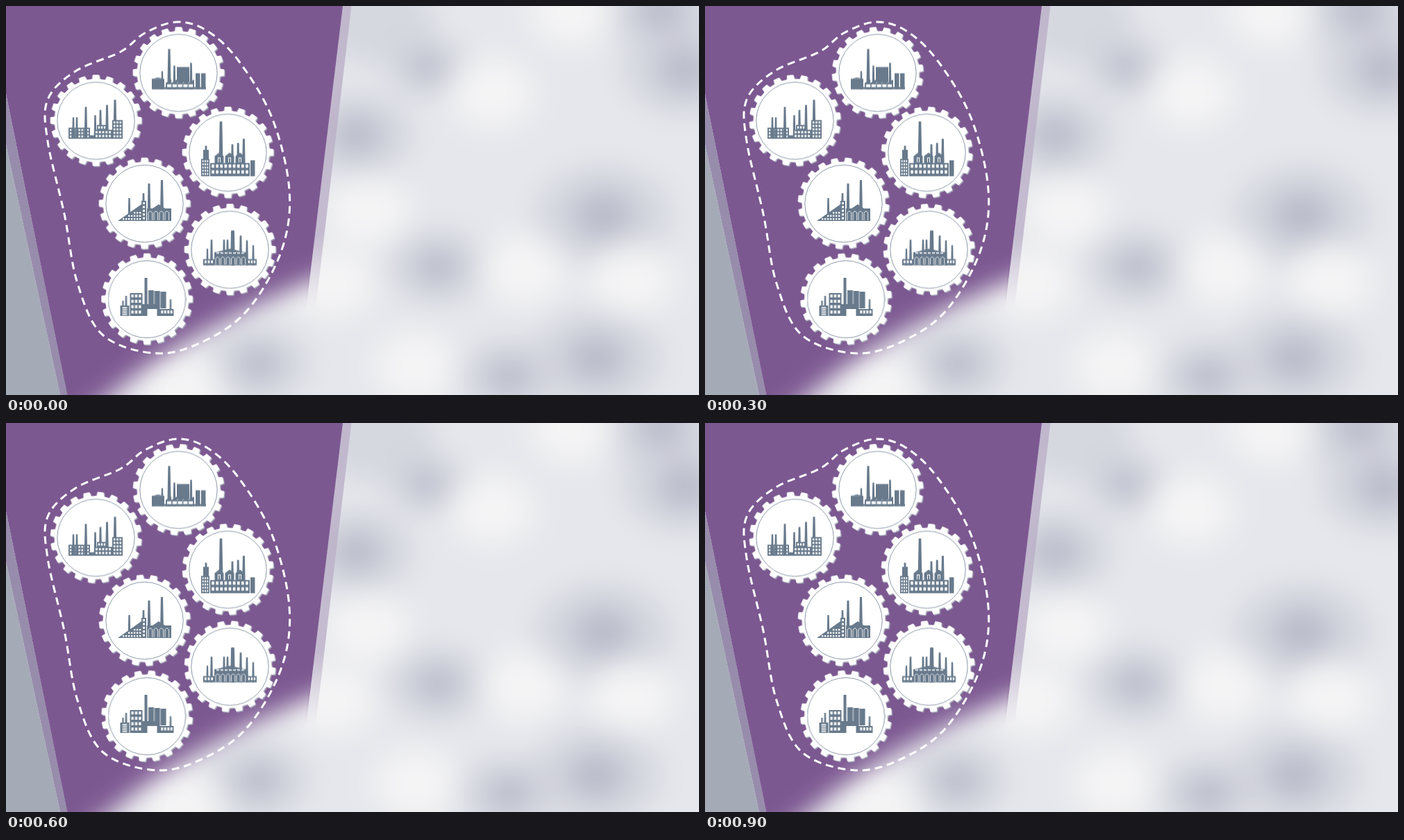
An HTML page for the animation above (1 s loop, 998 by 561 pixels).

```html
<!DOCTYPE html>
<html lang="en">
<head>
<meta charset="utf-8">
<title>Factory gears</title>
<style>
html, body { margin: 0; width: 100%; height: 100%; overflow: hidden; background: #e6e7ec; }
svg { display: block; width: 998px; height: 561px; }
</style>
</head>
<body>
<svg viewBox="0 0 998 561" xmlns="http://www.w3.org/2000/svg">
  <defs>
    <filter id="haze" filterUnits="userSpaceOnUse" x="-100" y="-100" width="1200" height="770"><feGaussianBlur stdDeviation="20"/></filter>
    <filter id="soft" filterUnits="userSpaceOnUse" x="-100" y="-100" width="800" height="800"><feGaussianBlur stdDeviation="17"/></filter>
    <linearGradient id="fade" x1="0" y1="330" x2="0" y2="435" gradientUnits="userSpaceOnUse">
      <stop offset="0" stop-color="#fff"/><stop offset="1" stop-color="#000"/>
    </linearGradient>
    <mask id="cloud" maskUnits="userSpaceOnUse" x="0" y="0" width="998" height="561">
      <path d="M-90-90H600V340Q310 428 160 553T-90 680Z" fill="#fff" filter="url(#soft)"/>
    </mask>
    <mask id="low" maskUnits="userSpaceOnUse" x="0" y="0" width="998" height="561">
      <rect width="998" height="561" fill="url(#fade)"/>
    </mask>
  </defs>
  <g id="mist" filter="url(#haze)"></g>
  <path d="M484 0H497.500L446 435H430Z" fill="#bcb0c9" opacity=".8" mask="url(#low)"/>
  <path d="M0 0H485L428 470 300 561H88L0 127Z" fill="#7c5891" mask="url(#cloud)"/>
  <path d="M0 127 88.500 561H78L0 200Z" fill="#988cac"/>
  <path d="M0 200 78 561H0Z" fill="#a5aab7"/>
  <path id="track" fill="none" stroke="#fff" stroke-width="3"/>
  <g id="gears"></g>
</svg>
<script>
const NS = 'http://www.w3.org/2000/svg';
const byId = id => document.getElementById(id);
const loop = (n, fn) => Array.from({ length: n }, (_, i) => fn(i));

function add(parent, tag, attrs) {
  const el = document.createElementNS(NS, tag);
  for (const k in attrs) el.setAttribute(k, attrs[k]);
  return parent.appendChild(el);
}

// Mist: light patches, then dark spots, each a wide halo with a core
const mist = byId('mist');
const puff = (cx, cy, rx, ry, fill, opacity) => add(mist, 'ellipse', { cx, cy, rx, ry, fill, opacity });
const dark = [[530, 20, 40], [607, 88, 28], [942, 5, 38], [978, 92, 42], [505, 186, 38],
  [860, 302, 46], [622, 376, 34], [364, 516, 34], [724, 535, 34], [850, 508, 44]];
const light = [[815, 8], [700, 125], [520, 295], [470, 400], [745, 380], [900, 395], [590, 520], [250, 550]];
add(mist, 'rect', { x: -100, y: -100, width: 1200, height: 770, fill: '#e6e7ec' });
for (const [x, y, r] of dark) puff(x, y, r * 2.2, r * 1.6, '#d0d2dc', .7);
for (const [x, y] of light) puff(x, y, 60, 50, '#f5f5f6', .95);
for (const [x, y, r] of dark.slice(1)) puff(x, y, r, r * .8, '#b6b8c7', .85);

// Poses rock back and forth in ten equal steps
const poseAt = i => 1 - Math.round(Math.cos(i * Math.PI / 2));
function play(el, frame) {
  const keys = loop(11, i => ({ ...frame(poseAt(Math.min(i, 9))), offset: i / 10, easing: 'steps(1, end)' }));
  el.animate(keys, { duration: 1000, iterations: Infinity }).startTime = 0;
}

// Dashed outline through a few points
function smooth(pts) {
  const n = pts.length, at = i => pts[(i + n) % n];
  const mix = (p, a, b) => p.map((v, k) => v + (b[k] - a[k]) / 6);
  return 'M' + pts[0] + loop(n, i => {
    const [a, b, c, e] = loop(4, k => at(i + k - 1));
    return `C${mix(b, a, c)} ${mix(c, e, b)} ${c}`;
  }).join('') + 'Z';
}
const track = byId('track');
track.setAttribute('d', smooth([
  [246, 23], [290, 36], [335, 79], [383, 161], [408, 265], [397, 352], [350, 436], [290, 481],
  [219, 501], [140, 475], [103, 400], [84, 300], [60, 195], [60, 135], [100, 94], [165, 66], [200, 39]]));
const DASH = 18, dashes = Math.round(track.getTotalLength() / DASH);
track.setAttribute('pathLength', dashes * DASH);
track.setAttribute('stroke-dasharray', '11 7');
play(track, p => ({ strokeDashoffset: 5.5 - p * DASH / 3 }));

// Gears
const TEETH = 20, PITCH = 360 / TEETH;
const polar = (deg, r) => [r * Math.sin(deg * Math.PI / 180), -r * Math.cos(deg * Math.PI / 180)]
  .map(v => v.toFixed(2)).join(' ');
const rim = 'M' + loop(TEETH, i => {
  const a = i * PITCH;
  return [polar(a - 4.9, 59.5), polar(a - 3.7, 65.3), polar(a + 3.7, 65.3), polar(a + 4.9, 59.5)].join('L');
}).join('L') + 'Z';

function makeGear(x, y, dir) {
  const gear = add(byId('gears'), 'g', { transform: `translate(${x} ${y})` });
  for (const [shift, color] of [[.8, '#a9aebb'], [-.5, '#fff']]) {
    const layer = add(gear, 'g', { transform: `translate(${shift} ${shift})` });
    const el = add(layer, 'path', { d: rim, fill: color, stroke: color, 'stroke-linejoin': 'round' });
    play(el, p => ({ transform: `rotate(${dir * p * PITCH / 3}deg)` }));
  }
  add(gear, 'circle', { cx: -.5, r: 55.7, fill: '#fff', stroke: '#8d99a8' });
  return gear;
}

// Factory kit: x from the centre of the plant, heights from the ground up
const STEEL = '#687a8c';
function kit(gear, ground) {
  const g = add(gear, 'g', { transform: `translate(0 ${ground})`, fill: STEEL });
  const shape = (d, fill = STEEL) => add(g, 'path', { d, fill });
  const box = (x, w, top, foot = 0, fill) => shape(`M${x} ${-top}h${w}v${top - foot}h${-w}z`, fill);
  const hall = (x, w, h, cols = 0, rows = 0) => {
    box(x, w, h);
    const dx = (w - 2) / cols, dy = (h - 2) / rows;
    loop(rows, r => loop(cols, c => {
      const top = h - 2 - r * dy;
      box(x + 1 + (c + .2) * dx, dx * .6, top, top - dy * .55, '#fff');
    }));
  };
  const stack = (x, h) => {
    const top = .8 + h / 80, foot = top + h / 50;
    shape(`M${x - top} ${-h}h${2 * top}L${x + foot} 0h${-2 * foot}z`);
  };
  const gable = (x, w, h, rise) => shape(`M${x - w / 2} ${-h}l${w / 2} ${-rise} ${w / 2} ${rise}z`);
  const arches = (x, n, step, h) => loop(n, i => add(g, 'path', {
    d: `M${x + i * step} -1v${3 - h}q${step * .35}-4 ${step * .7} 0V-1`,
    fill: 'none', stroke: '#fff', 'stroke-width': .8 }));
  return { shape, box, hall, stack, gable, arches };
}

function sawtooth({ shape, hall, stack, gable, box }) {
  hall(-39, 18, 15);
  gable(-30, 16, 15, 2);
  stack(-24, 26);
  stack(-14, 58);
  stack(-6.5, 34);
  stack(17.5, 38);
  box(-3, 18, 32, 10);
  loop(5, i => shape(`M${-19 + i * 8.2} 0v-9l8.200-5v14z`));
  loop(5, i => box(-17 + i * 7.8, 6, 7, 2.5, '#fff'));
  loop(2, i => box(24 + i * 8, 6.5, 23));
  box(-39, 78, 3);
}

function stepped({ hall, stack }) {
  hall(-40, 31, 16, 7, 3);
  loop(2, i => stack(-33 + i * 5, 31));
  stack(-15, 46);
  hall(-9, 32, 5);
  loop(4, i => stack(-1.5 + i * 6.5 + i * i, 34 + i * 7.4));
  hall(1, 14, 20, 3, 3);
  hall(-3, 26, 13, 5, 2);
  hall(23, 15, 27, 3, 5);
}

function gabled({ hall, stack, gable, box, arches }) {
  box(-36, 8, 38);
  stack(-32, 44);
  hall(-39, 12, 25, 3, 5);
  stack(-10.5, 79);
  loop(3, i => stack(6 + i * 8.2, 46 + i * i * 2));
  loop(3, i => {
    const x = -13 + i * 15;
    box(x - 6.5, 13, 29);
    gable(x, 13, 29, 5);
    box(x - 2, 4, 27, 20, '#fff');
    box(x - 1, 2, 26, 20);
  });
  hall(-26, 57, 19, 9, 2);
  box(32, 6.5, 23);
}

function conveyor({ shape, hall, stack, gable, arches, box }) {
  stack(-22.5, 33);
  stack(-2, 40);
  loop(2, i => stack(6 + i * 18.500, 54 + i * 5));
  shape('M-39 0l34-24V0z');
  loop(3, r => loop(7 - r * 2, c => box(-8 - c * 4, 2.3, 4 + r * 4.5, 1.6 + r * 4.5, '#fff')));
  hall(-5, 7, 29, 1, 5);
  hall(3, 35, 18);
  gable(20, 18, 18, 6);
  arches(5, 4, 8, 14);
}

function arched({ hall, stack, gable, arches, box }) {
  loop(2, i => stack(-33 + i * 6, 24 + i * 13));
  loop(2, i => stack(-9 + i * 5, 37));
  loop(3, i => stack(2.5 + i, 50));
  loop(3, i => stack(15 + i * 9, 43 - i * 7));
  hall(-39, 16, 9, 3, 1);
  hall(24, 14, 9, 3, 1);
  hall(-23, 47, 19);
  gable(0, 42, 19, 5);
  loop(7, i => box(-20 + i * 6, 4, 18.5, 17, '#fff'));
  arches(-21, 6, 7.5, 12);
}

function tanks({ hall, stack, box }) {
  loop(2, i => stack(-35 + i * 4.5, 22 + i * 7));
  hall(-39, 13, 15, 1, 5);
  hall(-25, 18, 33, 3, 4);
  box(-4, 4, 55);
  loop(3, i => box(1.5 + i * 8.8, 8, 37 - i, 11));
  box(-8, 26, 17, 10);
  loop(2, i => box(-8 + i * 22, 4, 17));
  stack(33.5, 24);
  hall(18, 20, 10, 4, 1);
}

for (const [x, y, dir, ground, build] of [
  [249, 96.5, -1, 23.5, sawtooth], [130, 165.5, -1, 26, stepped], [320, 211.5, 1, 34, gabled],
  [200, 285, 1, 25, conveyor], [323, 351.5, -1, 22.5, arched], [203.5, 423, -1, 24, tanks]])
  build(kit(makeGear(x, y, dir), ground));
</script>
</body>
</html>
```
